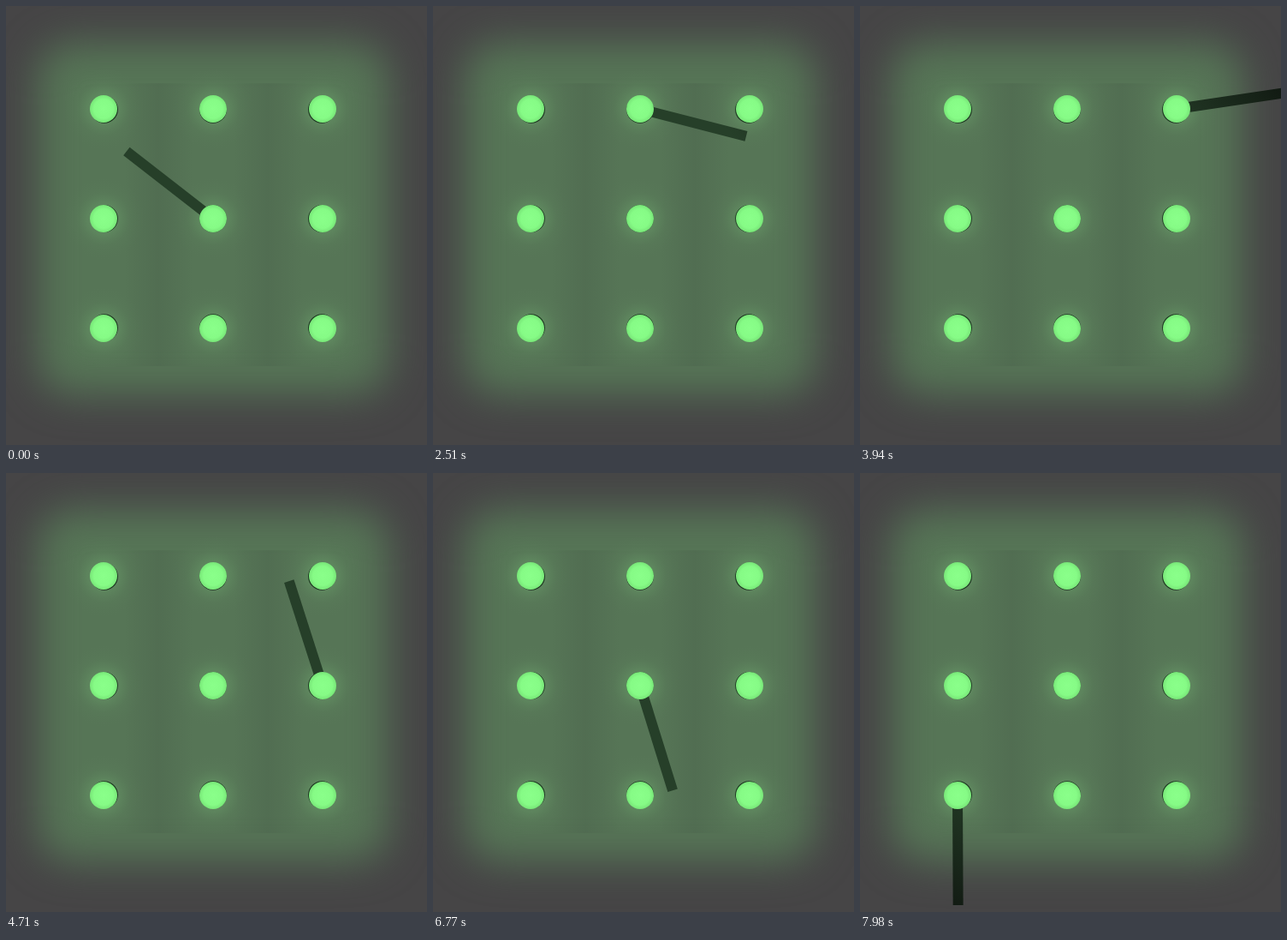
Recreate the animation shown at these times as an HTML page. Size 492x512 px, loop 8 s.

```html
<!DOCTYPE html>
<html lang="en">
<head>
<meta charset="utf-8">
<title>Swinging bar</title>
<style>
  html, body { margin: 0; width: 100%; height: 100%; overflow: hidden; background: #464546; }
  svg { display: block; }
</style>
</head>
<body>
<svg width="492" height="512" viewBox="0 0 492 512">
  <defs>
    <filter id="soft" filterUnits="userSpaceOnUse" x="-60" y="-60" width="612" height="632" color-interpolation-filters="sRGB">
      <feGaussianBlur stdDeviation="23"/>
    </filter>
    <radialGradient id="halo">
      <stop offset="0" stop-color="#72b072" stop-opacity=".55"/>
      <stop offset=".4" stop-color="#6aa06a" stop-opacity=".34"/>
      <stop offset=".65" stop-color="#629062" stop-opacity=".12"/>
      <stop offset="1" stop-color="#5c805c" stop-opacity="0"/>
    </radialGradient>
    <radialGradient id="ball">
      <stop offset="0" stop-color="#8aff8a"/>
      <stop offset=".7" stop-color="#86fb86"/>
      <stop offset="1" stop-color="#78e678"/>
    </radialGradient>
    <linearGradient id="band">
      <stop offset="0" stop-color="#465c48" stop-opacity="0"/>
      <stop offset=".5" stop-color="#465c48" stop-opacity=".3"/>
      <stop offset="1" stop-color="#465c48" stop-opacity="0"/>
    </linearGradient>
    <radialGradient id="barShade" gradientUnits="userSpaceOnUse" cx="242" cy="248" r="290">
      <stop offset=".5" stop-color="#263f29"/>
      <stop offset="1" stop-color="#121b13"/>
    </radialGradient>
  </defs>
  <rect width="492" height="512" fill="#464546"/>
  <rect x="37" y="43" width="410" height="410" rx="40" fill="#567556" filter="url(#soft)"/>
  <rect x="138" y="90" width="80" height="330" fill="url(#band)"/>
  <rect x="266" y="90" width="80" height="330" fill="url(#band)"/>
  <g id="halos"></g>
  <line id="bar" stroke="url(#barShade)" stroke-width="12"/>
  <g id="balls"></g>
</svg>
<script>
const LOOP = 8000, STEP = 66.6, LEAD = 25;
const SPACING = 128, SLOW = 2.865; // degrees per step

// [first step, column, row, angle in degrees, speed in multiples of SLOW]
const swings = [
  [0, 1, 1, 217.8, 1],
  [15, 1, 0, 80.3, -1],
  [40, 2, 0, 188.4, 1],
  [46.35, 2, 0, 206.6, 4],
  [67, 2, 1, 263.6, -1],
  [93, 1, 1, 8.7, 1],
  [97.56, 1, 1, 21.8, 4],
  [103, 1, 2, 264, -4],
  [110, 0, 2, 3.8, 1],
  [113, 0, 2, 12.5, 3.85]
];

const byId = id => document.getElementById(id);
const pegX = column => 114 + SPACING * column;
const pegY = row => 120 + SPACING * row;

function set(node, attributes) {
  for (const name in attributes) node.setAttribute(name, attributes[name]);
}

function addCircle(parent, cx, cy, r, fill) {
  const circle = document.createElementNS("http://www.w3.org/2000/svg", "circle");
  set(circle, { cx, cy, r, fill });
  byId(parent).append(circle);
}

for (let row = 0; row < 3; row++) {
  for (let column = 0; column < 3; column++) {
    const x = pegX(column), y = pegY(row);
    addCircle("halos", x, y, 48, "url(#halo)");
    // the dark underside peeks out towards the middle of the board
    addCircle("balls", x + (1 - column) * 0.9, y + (1 - row) * 0.8, 16, "#1d3520");
    addCircle("balls", x, y, 16, "url(#ball)");
  }
}

function draw() {
  const time = performance.now() % LOOP;
  const step = Math.floor((time + LEAD) / STEP);
  const [start, column, row, angle, speed] = swings.findLast(swing => swing[0] <= step);
  const turn = (angle + speed * SLOW * (step - start)) * Math.PI / 180;
  const x = pegX(column), y = pegY(row);
  set(byId("bar"), {
    x1: x, y1: y,
    x2: x + SPACING * Math.cos(turn),
    y2: y + SPACING * Math.sin(turn)
  });
  requestAnimationFrame(draw);
}
draw();
</script>
</body>
</html>
```
